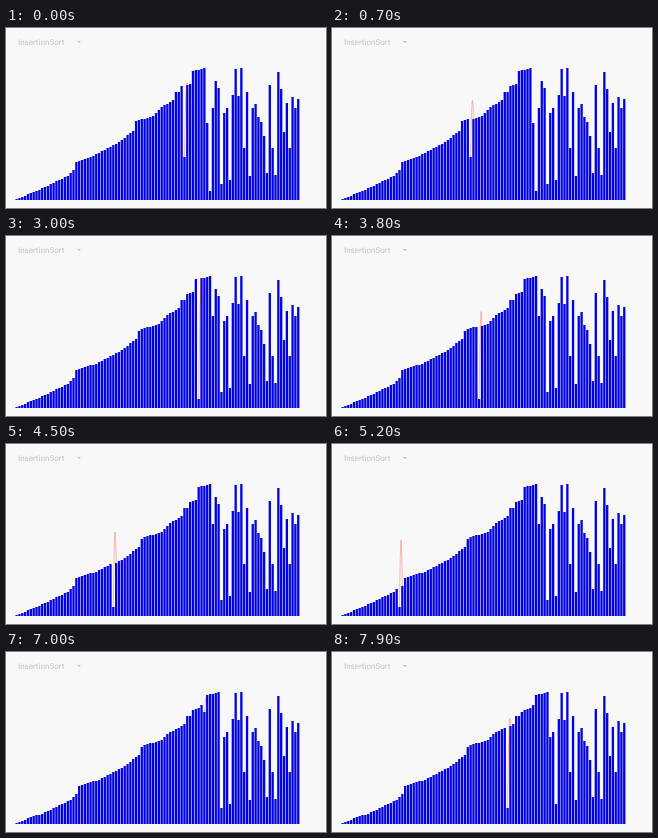
Write an HTML page with a canvas that moves like this. It is 320 px wide and 180 px high and loops after 8 s.

```html
<!DOCTYPE html>
<html lang="en">
<head>
<meta charset="utf-8">
<title>InsertionSort</title>
<style>
  html, body { margin: 0; width: 100%; height: 100%; overflow: hidden; background: #f8f8f8; }
  canvas { position: absolute; left: 0; top: 0; }
  .menu { position: absolute; left: 12px; top: 9px; font: 8px/11px Roboto, sans-serif; color: #c2c2c2; text-rendering: geometricPrecision; }
  .arrow { position: absolute; left: 71.4px; top: 13px; border: 2.4px solid transparent; border-top-color: #c2c2c2; border-bottom: 0; }
</style>
</head>
<body>
<canvas width="320" height="180"></canvas>
<div class="menu">InsertionSort</div>
<div class="arrow"></div>
<script>
const LOOP = 8000, STEP = 49.5, PHASE = 0.7;
const BASE = 172, TOP = 40, LEFT = 10.6, PITCH = 2.845, BAR = 2.3;
const SORTED = 66, FIRST_KEY = 129, FIRST_POS = 59;
const ctx = document.querySelector('canvas').getContext('2d');
const centre = k => LEFT + k * PITCH;

// Bars are stored by their top edge: a larger value is a shorter bar.
// The sorted slope is drawn through these [index, top] points.
const slope = [
  [0, 171], [7, 163], [18, 148], [20, 142], [21, 134], [26, 129],
  [36, 114], [41, 103], [42, 93], [48, 88], [51, 79], [55, 72],
  [56, 64], [57, 64], [58, 58], [60, 56], [61, 43], [65, 40]
];
const unsorted = [
  95, 163, 80, 53, 60, 156, 85, 80, 152, 67, 41,
  68, 40, 120, 64, 148, 80, 76, 89, 94, 108, 145,
  57, 120, 147, 44, 61, 104, 75, 120, 69, 80, 71
];

function slopeTop(k) {
  const n = Math.max(1, slope.findIndex(p => p[0] >= k));
  const [[x0, y0], [x1, y1]] = [slope[n - 1], slope[n]];
  return Math.round(y0 + (y1 - y0) * (k - x0) / (x1 - x0));
}

// Run the sort once; every swap adds one state.
function record() {
  const bars = [...Array.from({ length: SORTED }, (_, k) => slopeTop(k)), ...unsorted];
  bars.splice(FIRST_POS, 0, FIRST_KEY);
  const states = [];
  const save = pos => states.push({ bars: bars.slice(), pos });
  const insert = j => {
    for (; j > 0 && bars[j] > bars[j - 1]; j--) {
      [bars[j - 1], bars[j]] = [bars[j], bars[j - 1]];
      save(j - 1);
    }
    return j;
  };
  save(FIRST_POS);
  save(insert(FIRST_POS)); // rests one step before the next key
  for (let i = SORTED + 1; i < bars.length; i++) insert(i);
  return states;
}

const states = record();

function draw(time) {
  const { bars, pos } = states[Math.floor(PHASE + (time % LOOP) / STEP)];
  ctx.clearRect(0, 0, 320, 180);
  ctx.fillStyle = '#0000e2';
  bars.forEach((y, k) => ctx.fillRect(centre(k) - BAR / 2, y, BAR, BASE - y));

  // Arc linking the two bars just exchanged
  ctx.strokeStyle = '#f00';
  ctx.lineWidth = 0.28;
  ctx.beginPath();
  ctx.moveTo(centre(pos), bars[pos]);
  ctx.quadraticCurveTo(centre(pos + 0.5), TOP, centre(pos + 1), bars[pos + 1]);
  ctx.stroke();
}

const start = performance.now();
function tick() {
  draw(performance.now() - start);
  requestAnimationFrame(tick);
}
tick();
</script>
</body>
</html>
```
